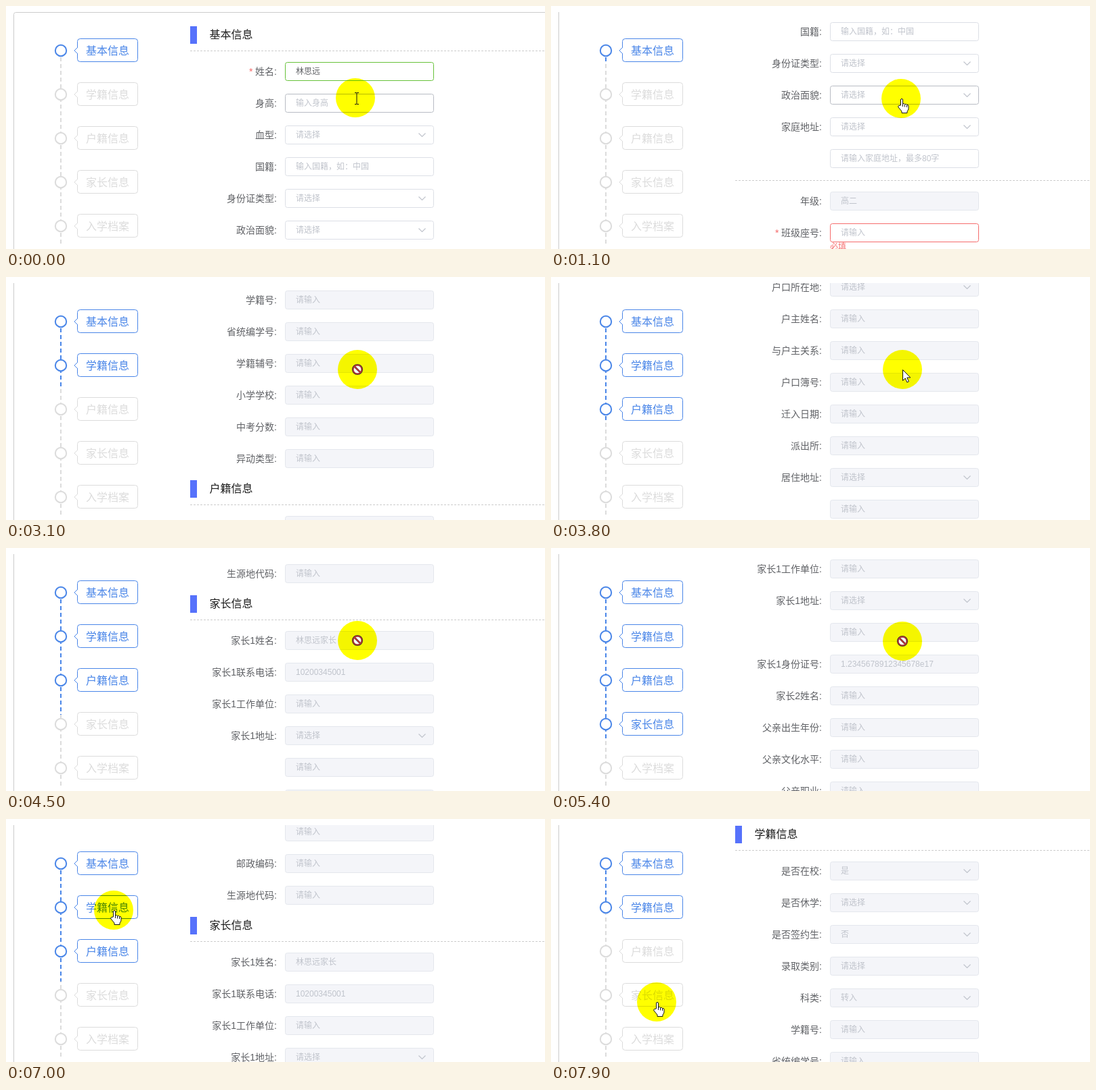
An HTML page that plays this animation: 796x360 px, repeating every 8 s.

```html
<!DOCTYPE html>
<html lang="zh-CN">
<head>
<meta charset="utf-8">
<style>
html, body { margin: 0; width: 100%; height: 100%; overflow: hidden; background: #fff; }
svg { display: block; width: 796px; height: 360px; font-family: 'Liberation Sans', 'Noto Sans CJK SC', 'Noto Sans CJK', sans-serif; }
</style>
</head>
<body>
<svg id="stage" viewBox="0 0 796 360">
  <defs><clipPath id="view"><rect y="9" width="796" height="351"/></clipPath></defs>
  <rect width="796" height="360" fill="#fff"/>
  <g clip-path="url(#view)"><g id="page"></g></g>
  <g id="steps"></g>
  <circle id="halo" r="29" fill="#ff0" style="mix-blend-mode:multiply"/>
  <g id="cursor">
    <path id="beam" d="M-3-8.5h2.5l.5.5l.5-.5H3M0-8V8M-3 8.5h2.5L0 8l.5.5H3" fill="none" stroke="#111"/>
    <g id="ban"><circle r="6.8" fill="#fff" stroke="#333" stroke-width="2.6"/><path d="M-5-5L5 5" stroke="#333" stroke-width="2.6"/><circle r="6.5" fill="none" stroke="#c33" stroke-width="1.4"/><path d="M-4.6-4.6L4.6 4.6" stroke="#c33" stroke-width="1.6"/></g>
    <path id="arrow" d="M.5.5v16l3.7-3.5 2.6 6 2.6-1.1-2.6-5.9h5z" fill="#fff" stroke="#111"/>
    <g id="hand" stroke="#111">
      <path d="M-1.500 10V2q0-1.500 1.500-1.500T1.500 2v6q2.700-1.200 3 .5 2.600-.8 3 1 2.500-.5 2.500 1.500v4q0 2-2 4v2.500H0V19l-5-6q-1-2 1-2.500z" fill="#fff"/>
      <path d="M1.500 8v4M4.500 9v3.500M7.500 10v3"/>
    </g>
  </g>
</svg>
<script>
const LOOP = 8000, BLUE = '#4a86e8', GREY = '#dcdcdc', RED = '#f56c6c';
const $ = id => document.getElementById(id);
const NS = 'http://www.w3.org/2000/svg';

function add(parent, tag, attrs, text) {
  const el = document.createElementNS(NS, tag);
  for (const k in attrs) el.setAttribute(k, attrs[k]);
  if (text) el.textContent = text;
  parent.appendChild(el);
  return el;
}
const write = (g, x, mid, size, fill, str, anchor = 'start') =>
  add(g, 'text', { x, y: mid + size * 0.37, 'font-size': size, fill, 'text-anchor': anchor }, str);

// Row: label|input text|flags. Flags: s select, d disabled, v typed value, o ok,
// e error, c calendar, - separator below. "/" breaks the label, "*" marks it required.
const sections = [
  ['基本信息', '', ['*姓名|林思远|vo', '身高|输入身高', '血型||s', '国籍|输入国籍，如：中国', '身份证类型||s',
    '政治面貌||s', '家庭地址||s', '|请输入家庭地址，最多80字|-', '年级|高二|d', '*班级座号||e', '入学日期||c', '宿舍号',
    '是否住校||s', '健康状况||s', '民族||s', '籍贯', '出生日期||c', '联系电话', '独生子女||s', '兴趣爱好', '紧急联系人', '备注']],
  ['学籍信息', 'd', ['是否在校|是|s', '是否休学||s', '是否签约生|否|s', '录取类别||s', '科类|转入|s', '学籍号',
    '省统编学号', '学籍辅号', '小学学校', '中考分数', '异动类型']],
  ['户籍信息', 'd', ['户口性质', '户口所在地||s', '户主姓名', '与户主关系', '户口簿号', '迁入日期', '派出所',
    '居住地址||s', '', '邮政编码', '生源地代码']],
  ['家长信息', 'd', ['家长1姓名|林思远家长', '家长1联系电话|10200345001', '家长1工作单位', '家长1地址||s', '',
    '家长1身份证号|1.2345678912345678e17', '家长2姓名', '父亲出生年份', '父亲文化水平', '父亲职业']],
  ['入学档案', 'd', ['在校曾担任何职务/（班级、校级或以/上）', '本人特长与爱好', '曾参加过什么比赛，/获得什么奖项',
    '是否有主持、朗诵、/演讲的经验||s', '曾在学校参加过什么/活动']]
];

const page = $('page'), rows = [], tops = [];
const rule = y => add(page, 'path', { d: `M272 ${y + .5}H796`, stroke: '#ccc', 'stroke-dasharray': '3 2' });

function drawRow(spec, y, common) {
  let [label, hint = '', flags = ''] = spec.split('|');
  flags += common;
  const has = f => flags.includes(f);
  const required = label[0] === '*';
  const lines = label.replace('*', '').split('/');
  lines.forEach((line, i) => {
    if (!line) return;
    const last = i === lines.length - 1;
    write(page, 400, y - .5 + i * 28, 14, '#606266', line + (last ? ':' : ''), 'end');
    if (required) write(page, 400 - 14 * line.length - 13, y, 14, RED, '*');
  });
  const stroke = has('o') ? '#67c23a' : has('e') ? RED : has('d') ? '#e4e7ed' : '#dcdfe6';
  const box = add(page, 'rect', { x: 412.5, y: y - 13.5, width: 219, height: 27, rx: 3, fill: has('d') ? '#f4f5f9' : '#fff', stroke });
  if (has('c')) {
    add(page, 'path', { d: `M424.5 ${y - 4.5}h11v10h-11zM424.5 ${y - 1.5}h11M427.5 ${y - 6}v3M432.5 ${y - 6}v3M427 ${y + 1.5}h6M427 ${y + 3.5}h6`, fill: 'none', stroke: '#c0c4cc' });
  } else {
    write(page, 428, y, 12, has('v') ? '#606266' : '#c0c4cc', hint || (has('s') ? '请选择' : '请输入'));
  }
  if (has('s')) add(page, 'path', { d: `M609.5 ${y - 2.5}l5 5 5-5`, fill: 'none', stroke: '#c0c4cc', 'stroke-width': 1.2 });
  if (has('e')) write(page, 412, y + 21, 12, RED, '必填');
  if (has('-')) rule(y + 32);
  rows.push({ y, box, stroke, off: has('d'), pick: has('s'), fixed: has('o') || has('e') });
  return y + Math.max(29, 28 * lines.length) + 18 + (has('-') ? 16 : 0);
}

add(page, 'rect', { x: 11.5, y: 9.5, width: 900, height: 4200, rx: 3, fill: 'none', stroke: '#ccc' });
let ruleY = 66;
for (const [title, common, specs] of sections) {
  tops.push(ruleY);
  add(page, 'rect', { x: 272, y: ruleY - 36, width: 10, height: 26, fill: '#5672fb' });
  write(page, 300.5, ruleY - 24, 16, '#1c1c1c', title);
  rule(ruleY);
  let y = ruleY + 31;
  for (const spec of specs) y = drawRow(spec, y, common);
  ruleY = y + 21;
}
const endY = ruleY;

const stepY = i => 66 + 65 * i;
const track = color => add($('steps'), 'path', { d: 'M81 76V356', stroke: color, 'stroke-width': 2, 'stroke-dasharray': '6 4' });
track(GREY);
const done = track(BLUE);
const steps = sections.map(([title], i) => {
  const g = add($('steps'), 'g', { fill: '#fff' }), y = stepY(i);
  add(g, 'circle', { cx: 81, cy: y, r: 8.2, 'stroke-width': 2 });
  add(g, 'rect', { x: 105.5, y: y - 17.5, width: 89, height: 34, rx: 4 });
  add(g, 'path', { d: `M106 ${y - 5}l-5 5 5 5` });
  return { g, text: write(g, 150, y, 16, GREY, title, 'middle') };
});

const scrollKeys = [[499, 0], [500, 100], [1700, 300], [1800, 300], [1900, 400], [3000, 1400], [3100, 1400], [3200, 1500],
  [3500, 1700], [3799, 1700], [3800, 1800], [4400, 2200], [4799, 2200], [4800, 2300], [5300, 2400], [5400, 2400], [5800, 2800],
  [6800, 2800], [7300, 1122]];
const xKeys = [[0, 518], [5300, 519], [5800, 519], [6100, 300], [6600, 160], [7150, 160], [7400, 168], [7650, 144], [7900, 157]];
const yKeys = [[4600, 137], [5300, 138], [5800, 138], [6100, 189], [6600, 135], [7150, 135], [7400, 173], [7900, 271]];

function at(keys, t) {
  const i = keys.findIndex(k => k[0] > t);
  if (i === 0) return keys[0][1];
  if (i < 0) return keys[keys.length - 1][1];
  const [t0, a] = keys[i - 1], [t1, b] = keys[i];
  return a + (b - a) * (t - t0) / (t1 - t0);
}

function render(t) {
  let s = at(scrollKeys, t);
  s = t < 6800 ? Math.floor(s / 100 + 1e-6) * 100 : Math.round(s); // wheel notches
  page.setAttribute('transform', `translate(0 ${-s})`);

  let active = 0;
  tops.forEach((d, i) => { if (d - s <= 46) active = i; });
  steps.forEach(({ g, text }, i) => {
    const color = i <= active ? BLUE : GREY;
    g.setAttribute('stroke', color);
    text.setAttribute('stroke', 'none');
    text.setAttribute('fill', color);
  });
  const span = (tops[active + 1] || endY) - tops[active];
  const part = Math.max(0, Math.min(1, (s + 46 - tops[active]) / span));
  done.setAttribute('d', `M81 76V${Math.max(76, stepY(active) + 9 + 47 * part)}`);

  const x = Math.round(at(xKeys, t)), y = Math.round(at(yKeys, t));
  let over = null;
  for (const r of rows) {
    const hit = x > 412 && x < 632 && Math.abs(r.y - s - y) <= 14;
    if (hit) over = r;
    r.box.setAttribute('stroke', hit && !r.off && !r.fixed ? '#b8bcc4' : r.stroke);
  }
  const onStep = x > 105 && x < 195 && steps.some((_, i) => Math.abs(stepY(i) - y) <= 17);
  const kind = over ? (over.off ? 'ban' : over.pick ? 'hand' : 'beam') : onStep ? 'hand' : 'arrow';
  for (const id of ['beam', 'ban', 'arrow', 'hand']) $(id).style.display = id === kind ? '' : 'none';
  $('cursor').setAttribute('transform', `translate(${x} ${y})`);
  const shift = kind === 'beam' ? 2 : kind === 'hand' ? 1 : 0;
  $('halo').setAttribute('cx', x - shift);
  $('halo').setAttribute('cy', kind === 'beam' ? y - 1 : y);
}

const start = performance.now();
function tick() {
  render((performance.now() - start) % LOOP);
  requestAnimationFrame(tick);
}
tick();
</script>
</body>
</html>
```
